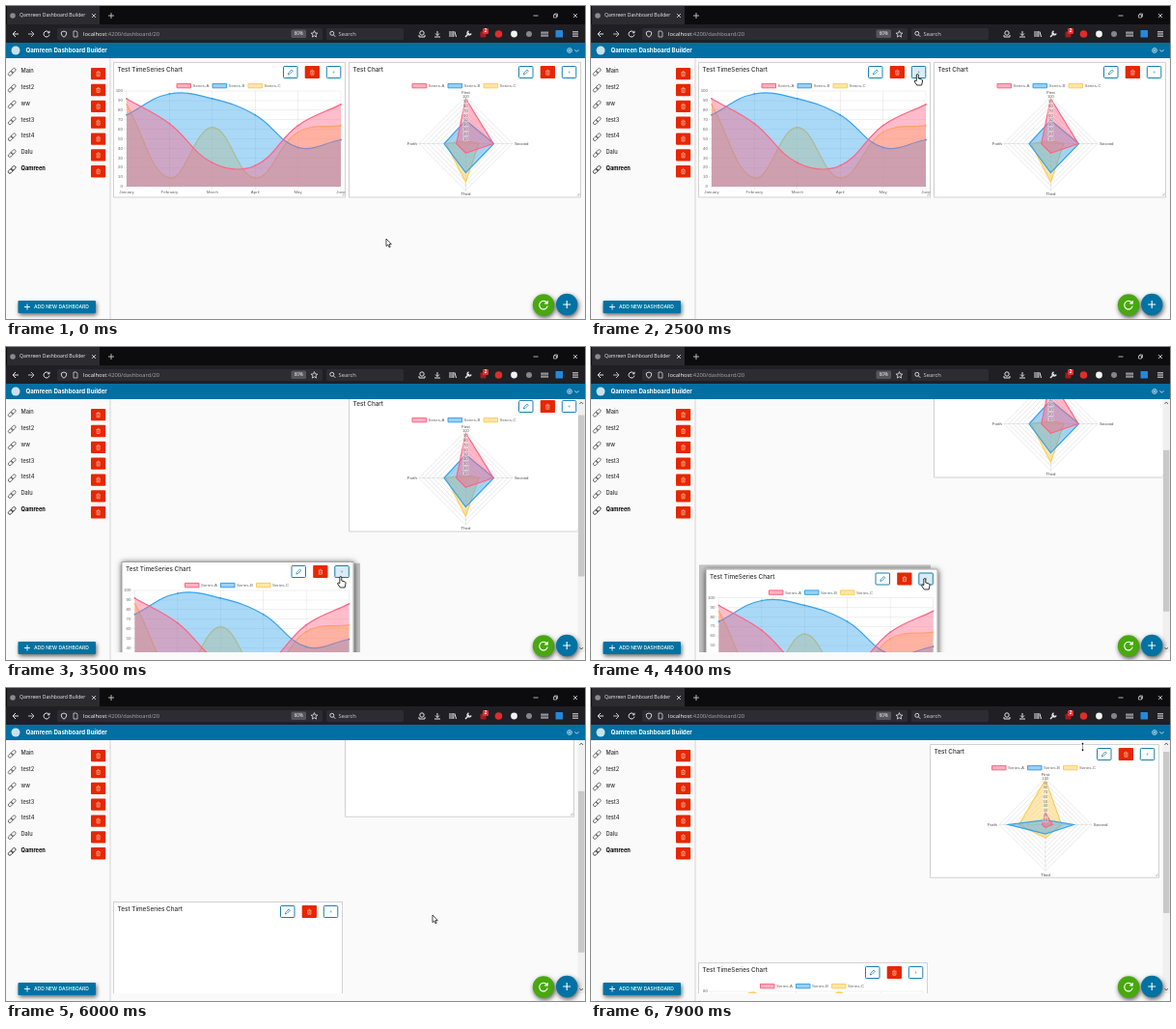
These frames come from a looping animation (600x324 px, 8 s). An HTML page with a canvas:

```html
<!DOCTYPE html>
<html lang="en">
<head>
<meta charset="utf-8">
<title>Dashboard</title>
<style>
html, body { margin: 0; width: 100%; height: 100%; overflow: hidden; background: #fafafa; }
canvas { display: block; width: 600px; height: 324px; }
</style>
</head>
<body>
<canvas id="stage"></canvas>
<script>
const LOOP = 8000;
const canvas = document.getElementById('stage');
const c = canvas.getContext('2d');
const ratio = window.devicePixelRatio || 1;
canvas.width = 600 * ratio;
canvas.height = 324 * ratio;

const APP = 'Qamreen Dashboard Builder';
const MENU = ['Main', 'test2', 'ww', 'test3', 'test4', 'Dalu', 'Qamreen'];
const MONTHS = ['January', 'February', 'March', 'April', 'May', 'June'];
const UI = 'Inter, sans-serif';
const SYS = '"Open Sans", sans-serif';
const PLOT = '"Liberation Sans", Arial, sans-serif';
const BLUE = '#0072a3', RED = '#e62700';
const SERIES = ['255,99,132', '54,162,235', '255,205,86'];

const wave = phase => MONTHS.map((_, i) => 40 + 20 * Math.sin(i * 2 + phase));
const lineOld = { max: 100, data: [[92, 66, 25, 22, 64, 86], [75, 97, 92, 75, 41, 49], [86, 9, 62, 9, 57, 64]] };
const lineNew = { max: 80, data: [wave(0), wave(3), [40, 79, 30, 79, 35, 45]] };
const radarOld = [[96, 59, 20, 20], [50, 60, 62, 46], [6, 28, 82, 42]];
const radarNew = [[26, 15, 6, 7], [10, 61, 20, 80], [97, 35, 29, 57]];

// Linear interpolation through [time, value] pairs, held at both ends.
function track(t, ...keys) {
  const i = keys.findIndex(k => k[0] > t);
  if (i === 0) return keys[0][1];
  if (i < 0) return keys[keys.length - 1][1];
  const [ta, a] = keys[i - 1], [tb, b] = keys[i];
  return a + (b - a) * (t - ta) / (tb - ta);
}

function cardPose(t) {
  const scroll = track(t, [3400, 0], [3500, 7], [4400, 63], [6800, 63], [7200, 0]);
  const settled = track(t, [5400, 0], [5600, 1]);
  const x = track(t, [2700, 112], [3000, 113], [3400, 120], [3500, 120.5], [4400, 119.5],
    [4500, 119.5], [4800, 124], [5200, 124], [5400, 118], [5600, 112]);
  const y = t >= 5600 ? 284 - scroll : track(t, [2700, 58], [3000, 98], [3400, 212], [3500, 222],
    [4400, 229.5], [4500, 229.5], [4800, 222], [5600, 221]);
  return { x, y, scroll, w: 240 - 3 * settled, x2: 356 - 4 * settled };
}

function pointerPose(t, card) {
  if (t < 2500) return [394, 241];
  if (t < 5400) return [card.x + 226.3, card.y + track(t, [2700, 13], [3500, 16], [4400, 10.5], [4800, 13])];
  return [
    track(t, [5400, 344], [5600, 360], [5900, 442], [7300, 442], [7500, 467], [7600, 467], [7900, 509.5]),
    track(t, [5400, 236], [5900, 235], [7300, 235], [7500, 62], [7900, 61])
  ];
}

function rect(x, y, w, h, fill, r = 0) {
  c.fillStyle = fill;
  c.beginPath();
  c.roundRect(x, y, w, h, r);
  c.fill();
}
function box(x, y, w, h, stroke, r = 0, width = 1) {
  c.strokeStyle = stroke;
  c.lineWidth = width;
  c.beginPath();
  c.roundRect(x, y, w, h, r);
  c.stroke();
}
function disc(x, y, r, fill) {
  c.fillStyle = fill;
  c.beginPath();
  c.arc(x, y, r, 0, 7);
  c.fill();
}
function text(s, x, y, size, fill, font = UI, weight = 400, align = 'left') {
  c.font = `${weight} ${size}px ${font}`;
  c.textAlign = align;
  c.textBaseline = 'middle';
  c.fillStyle = fill;
  c.fillText(s, x, y);
  return c.measureText(s).width;
}
// Strokes (and optionally fills) SVG path data placed at x, y.
function icon(d, x, y, stroke, width = 1, fill) {
  c.save();
  c.translate(x, y);
  const p = new Path2D(d);
  if (fill) { c.fillStyle = fill; c.fill(p); }
  c.strokeStyle = stroke;
  c.lineWidth = width;
  c.stroke(p);
  c.restore();
}
function ring(x, y, r, stroke, width) {
  c.strokeStyle = stroke;
  c.lineWidth = width;
  c.beginPath();
  c.arc(x, y, r, 0, 7);
  c.stroke();
}
function shadow(blur, dx, dy, color, draw) {
  c.save();
  c.shadowColor = color;
  c.shadowBlur = blur * ratio;
  c.shadowOffsetX = dx * ratio;
  c.shadowOffsetY = dy * ratio;
  draw();
  c.restore();
}

const CROSS = 'M-2-2L2 2M2-2L-2 2';
const PLUS = 'M-3 0H3M0-3V3';
const TRASH = 'M-2-1.5H2M-1.5-1.5V2.5H1.5V-1.5M-.7-2.5H.7M0-.3V1.5';
const PENCIL = 'M-2.5 2.5L-2 .8L1.3-2.5L2.5-1.3L-.8 2Z';
const RELOAD = 'M2.6-1.6A3 3 0 1 0 3 .6M3-3.2V-1.2H1';

function browser() {
  rect(0, 0, 600, 19, '#0c0c0f');
  rect(1, 0, 96, 19, '#2b2b30');
  rect(0, 19, 600, 19, '#1f1f24');
  disc(7, 10, 2.8, '#8a8a90');
  text(APP, 14, 10, 5.1, '#f0f0f2', SYS);
  icon(CROSS, 91, 10, '#ddd', .8);
  icon(PLUS, 109, 10, '#ddd', .8);
  icon('M-2.5 0H2.5', 549, 10, '#ddd', .8);
  icon('M-2-1H1V2H-2ZM-1-1V-2H2V1H1', 569.5, 10, '#ddd', .7);
  icon(CROSS, 590, 10, '#ddd', .8);

  const ink = '#e4e4e6';
  icon('M3 0H-3M0-3L-3 0L0 3', 10, 29, ink);
  icon('M-3 0H3M0-3L3 0L0 3', 26, 29, '#b9b9bd');
  icon(RELOAD, 42, 29, ink);
  rect(53, 23, 275, 12, '#2c2c32', 1.5);
  rect(332, 23, 80, 12, '#2c2c32', 1.5);
  icon('M0-3L2.6-2V0Q2.4 2 0 3.2Q-2.4 2-2.6 0V-2Z', 60, 29, ink, .9);
  icon('M-2-3H1L2-2V3H-2Z', 72, 29, ink, .7);
  const w = text('localhost', 80, 29, 5.8, '#fff', SYS);
  text(':4200/dashboard/20', 80 + w, 29, 5.8, '#a9a9ad', SYS);
  rect(295.5, 24.5, 15.5, 8.5, '#55555b', 1.5);
  text('60%', 303.2, 29, 4.6, '#fff', SYS, 400, 'center');
  icon('M0-3.4L1-1L3.4-.9L1.5.7L2.1 3.1L0 1.8L-2.1 3.1L-1.5.7L-3.4-.9L-1-1Z', 319.5, 29, ink, .8);
  ring(337.8, 28.3, 2, ink, .9);
  icon('M0 0L2 2', 339.3, 29.8, ink, .9);
  text('Search', 344.5, 29, 5.8, '#d5d5d8', SYS);
  ring(431, 28, 2.2, ink, 1);
  icon('M-3 1V3H3V1', 431, 29, ink);
  icon('M0-3V1.5M-2-.5L0 1.5L2-.5M-3 3H3', 447, 29, ink);
  icon('M-3-3V3M-1-3V3M.8-3V3M2-2.5L3.5 3', 463, 29, ink);
  icon('M-3 3L1-1M.5-3A2 2 0 1 0 3-.5', 479, 29, ink, 1.5);
  rect(491.5, 26.5, 6, 6, '#a01c20', 1);
  rect(494, 23, 6, 6, '#e03238', 1);
  text('2', 497, 26.2, 4.5, '#fff', SYS, 700, 'center');
  disc(510.5, 29, 3.8, '#e02c2c');
  disc(526.5, 29, 3.4, '#f2f2f2');
  disc(542, 29, 3, '#85868c');
  for (let i = 0; i < 8; i++) rect(554.5 + i % 4 * 2, 26.5 + (i >> 2) * 3, 1.3, 2.2, '#d0d0d4');
  rect(569.5, 25, 7.5, 7.5, '#2389dc', .5);
  icon('M-3-2.2H3M-3 0H3M-3 2.2H3', 590, 29, ink);
}

function frameUi() {
  rect(0, 38, 600, 16, '#006fa3');
  disc(10, 46, 4.5, '#c9e1ed');
  text(APP, 20.5, 46, 6.15, '#fff', UI, 700);
  ring(584, 46, 2.4, '#d6e8f1', .8);
  ring(584, 46, 1, '#d6e8f1', .8);
  icon('M-2-1L0 1L2-1', 591.5, 46.3, '#d6e8f1', .9);

  rect(107.5, 54, 1, 270, '#d5d5d5');
  MENU.forEach((name, i) => {
    const y = 67.3 + i * 16.85, last = i === MENU.length - 1;
    c.save();
    c.translate(6.2, y + 1);
    c.rotate(-Math.PI / 4);
    box(-4.8, -1.6, 5.4, 3.2, last ? '#222' : '#555', 1.6, .8);
    box(-.6, -1.6, 5.4, 3.2, last ? '#222' : '#555', 1.6, .8);
    c.restore();
    text(name, 15.5, y, 5.7, last ? '#000' : '#333', UI, last ? 700 : 500);
    rect(88, y - 3.3, 15.2, 12.3, RED, 1);
    icon(TRASH, 95.6, y + 2.8, '#ffd9d0', .6);
  });

  shadow(4, 1, 2, '#0009', () => rect(12.5, 305, 80.5, 13, BLUE, 1));
  icon(PLUS, 22, 311.5, '#fff', .9);
  text('ADD NEW DASHBOARD', 29, 311.6, 5.05, '#fff', UI, 500);
}

function roundButtons() {
  shadow(5, 1, 2, '#000a', () => disc(557, 309.5, 11.2, '#48a80f'));
  shadow(5, 1, 2, '#000a', () => disc(581.2, 309, 11.2, BLUE));
  icon('M3.5-2.4A4.3 4.3 0 1 0 4.2 1M4.2-4.6V-1.6H1.2', 557, 309.5, '#fff', 1.1);
  icon('M-4 0H4M0-4V4', 581.2, 309, '#fff', 1.1);
}

function legend(mid, y) {
  SERIES.forEach((rgb, i) => {
    const x = mid - 55 + i * 37;
    rect(x, y - 2.2, 14.5, 4.4, `rgba(${rgb},.5)`);
    box(x, y - 2.2, 14.5, 4.4, `rgb(${rgb})`);
    text('Series-' + 'ABC'[i], x + 16.5, y + .2, 4.4, '#666', PLOT);
  });
}

function lineChart(x, y, w, { max, data }, grow) {
  const left = x + 13, step = (w - 18) / 5, top = y + 30, h = 99;
  legend(x + w / 2, y + 24.6);
  const n = max / 10;
  for (let i = 0; i <= n; i++) {
    const gy = top + h * i / n;
    rect(left - 3, gy - .25, w - 15, .5, '#0000001f');
    text(max - i * 10, left - 4, gy, 4.4, '#666', PLOT, 400, 'right');
  }
  MONTHS.forEach((m, i) => {
    rect(left + step * i - .25, top, .5, h + 3, '#0000001f');
    text(m, left + step * i, top + h + 6, 4.4, '#666', PLOT, 400, 'center');
  });
  const clampY = v => Math.max(top, Math.min(top + h, v));
  for (let s = 2; s >= 0; s--) {
    const pts = data[s].map((v, i) => [left + step * i, top + h * (1 - v * grow / max)]);
    const handles = pts.map(([px, py], i) => {
      const a = pts[Math.max(i - 1, 0)], b = pts[Math.min(i + 1, 5)];
      const la = Math.hypot(px - a[0], py - a[1]), lb = Math.hypot(b[0] - px, b[1] - py);
      const fa = .4 * la / (la + lb), fb = .4 * lb / (la + lb);
      const dx = b[0] - a[0], dy = b[1] - a[1];
      return [px - fa * dx, clampY(py - fa * dy), px + fb * dx, clampY(py + fb * dy)];
    });
    const curve = new Path2D();
    curve.moveTo(...pts[0]);
    for (let i = 1; i < 6; i++) {
      curve.bezierCurveTo(...handles[i - 1].slice(2), ...handles[i].slice(0, 2), ...pts[i]);
    }
    const area = new Path2D(curve);
    area.lineTo(pts[5][0], top + h);
    area.lineTo(left, top + h);
    c.fillStyle = `rgba(${SERIES[s]},.42)`;
    c.fill(area);
    c.strokeStyle = `rgb(${SERIES[s]})`;
    c.lineWidth = 1.2;
    c.stroke(curve);
    pts.forEach(p => disc(...p, .9, `rgb(${SERIES[s]})`));
  }
}

function radarChart(x, y, w, data, grow) {
  const mx = x + w / 2 + .4, my = y + 84 * w / 240 + .5, r = 48.5 * w / 240;
  const diamond = vals => {
    c.beginPath();
    vals.forEach((v, i) => c.lineTo(mx + [0, 1, 0, -1][i] * v, my + [-1, 0, 1, 0][i] * v));
    c.closePath();
  };
  legend(x + w / 2, y + 24.6);
  c.strokeStyle = '#00000026';
  c.lineWidth = .6;
  for (let i = 1; i <= 10; i++) {
    diamond(Array(4).fill(r * i / 10));
    c.stroke();
  }
  icon(`M${-r} 0H${r}M0${-r}V${r}`, mx, my, '#00000026', .6);
  for (let s = 2; s >= 0; s--) {
    diamond(data[s].map(v => v * r / 100 * grow));
    c.fillStyle = `rgba(${SERIES[s]},.45)`;
    c.fill();
    c.strokeStyle = `rgb(${SERIES[s]})`;
    c.lineWidth = 1.2;
    c.stroke();
  }
  for (let i = 1; i <= 10; i++) {
    const ty = my - r * i / 10;
    rect(mx - 3, ty - 2.2, 6, 4.4, '#ffffff70');
    text(i * 10, mx, ty, 4.2, '#666', PLOT, 400, 'center');
  }
  text('First', mx, my - r - 4, 4.3, '#444', PLOT, 400, 'center');
  text('Second', mx + r + 2, my, 4.3, '#444', PLOT);
  text('Third', mx, my + r + 4, 4.3, '#444', PLOT, 400, 'center');
  text('Forth', mx - r - 2, my, 4.3, '#444', PLOT, 400, 'right');
}

function drawCard(x, y, w, title, { lifted, hover } = {}) {
  const h = 140 * w / 240, right = x + w;
  if (lifted) shadow(6, 0, 1, '#000b', () => rect(x - .5, y, w + .5, h, '#fff'));
  else rect(x, y, w, h, '#fff');
  box(x - .5, y + .5, w, h - .5, lifted ? '#999' : '#ccc', 0, .9);
  text(title, x + 3.6, y + 8.4, 6.35, '#333', UI, 500);
  box(right - 64.5, y + 4.5, 14.5, 12, BLUE, 1, .9);
  icon(PENCIL, right - 57.2, y + 10.5, BLUE, .7);
  rect(right - 42.3, y + 4, 15.3, 13, RED, 1);
  icon(TRASH, right - 34.6, y + 10.7, '#ffd9d0', .6);
  if (hover) rect(right - 20, y + 4, 15, 13, '#dcebf3', 1);
  box(right - 19.7, y + 4.5, 14.5, 12, BLUE, 1, .9);
  icon('M-1 0H1M0-1.3V1.3', right - 12.4, y + 10.5, '#6aaac8', .6);
  if (!lifted) icon('M0-2V0H-2', right - 2, y + h - 2, '#aaa', .7);
}

function scrollbar(scroll) {
  rect(592.5, 54, 7.5, 262, '#f0f0f0');
  rect(593, 66 + scroll * .645, 6.5, 167, '#c9c9c9');
  icon('M-1.8 1L0-1L1.8 1', 596.2, 58, '#555', .9);
  icon('M-1.8-1L0 1L1.8-1', 596.2, 312, '#555', .9);
}

function pointer(t, x, y) {
  if (t >= 7800) {
    icon('M0-5L2-2.4H.5V2.4H2L0 5L-2 2.4H-.5V-2.4H-2Z', x, y, '#fff', .8, '#000');
  } else if (t >= 2500 && t < 5500) {
    icon('M-1 0Q0-1 1 0V4L4.5 5Q5.5 5.5 5.2 7L4.3 11H-.5L-3.3 7Q-3 5.2-1 6.6Z', x, y, '#000', .8, '#fff');
  } else {
    icon('M0 0V7.6L1.8 6L3 8.8L4.2 8.2L3 5.6H5.3Z', x, y, '#000', .7, '#fff');
  }
}

function draw(t) {
  const card = cardPose(t), { x, y, w, x2, scroll } = card;
  const dragging = t >= 2800 && t < 5400;
  const loaded = t >= 6100, empty = t >= 6000 && !loaded;
  const grow = loaded ? 1 - (1 - Math.min(1, (t - 6000) / 300)) ** 4 : 1;

  c.setTransform(ratio, 0, 0, ratio, 0, 0);
  rect(0, 0, 600, 324, '#fafafa');
  browser();
  frameUi();

  c.save();
  c.beginPath();
  c.rect(108.5, 54, 491.5, 262);
  c.clip();
  drawCard(x2, 58 - scroll, w, 'Test Chart');
  if (!empty) radarChart(x2, 58 - scroll, w, loaded ? radarNew : radarOld, grow);
  if (dragging) {
    // The drop preview snaps to the grid.
    const col = Math.round((x - 112) / 15 - .05), row = Math.round((y + scroll - 58) / 14.4);
    rect(112 + col * 15, 58 + row * 14.4 - scroll, 240, 140, '#c4c4c4');
  }
  drawCard(x, y, w, 'Test TimeSeries Chart', { lifted: dragging, hover: t >= 2500 && t < 5400 });
  if (!empty) lineChart(x, y, w, loaded ? lineNew : lineOld, grow);
  if (t >= 3200) scrollbar(scroll);
  c.restore();

  roundButtons();
  pointer(t, ...pointerPose(t, card));
}

// The screen refreshes every 100 ms.
function tick() {
  draw(Math.floor(performance.now() % LOOP / 100) * 100);
  requestAnimationFrame(tick);
}
tick();
</script>
</body>
</html>
```
